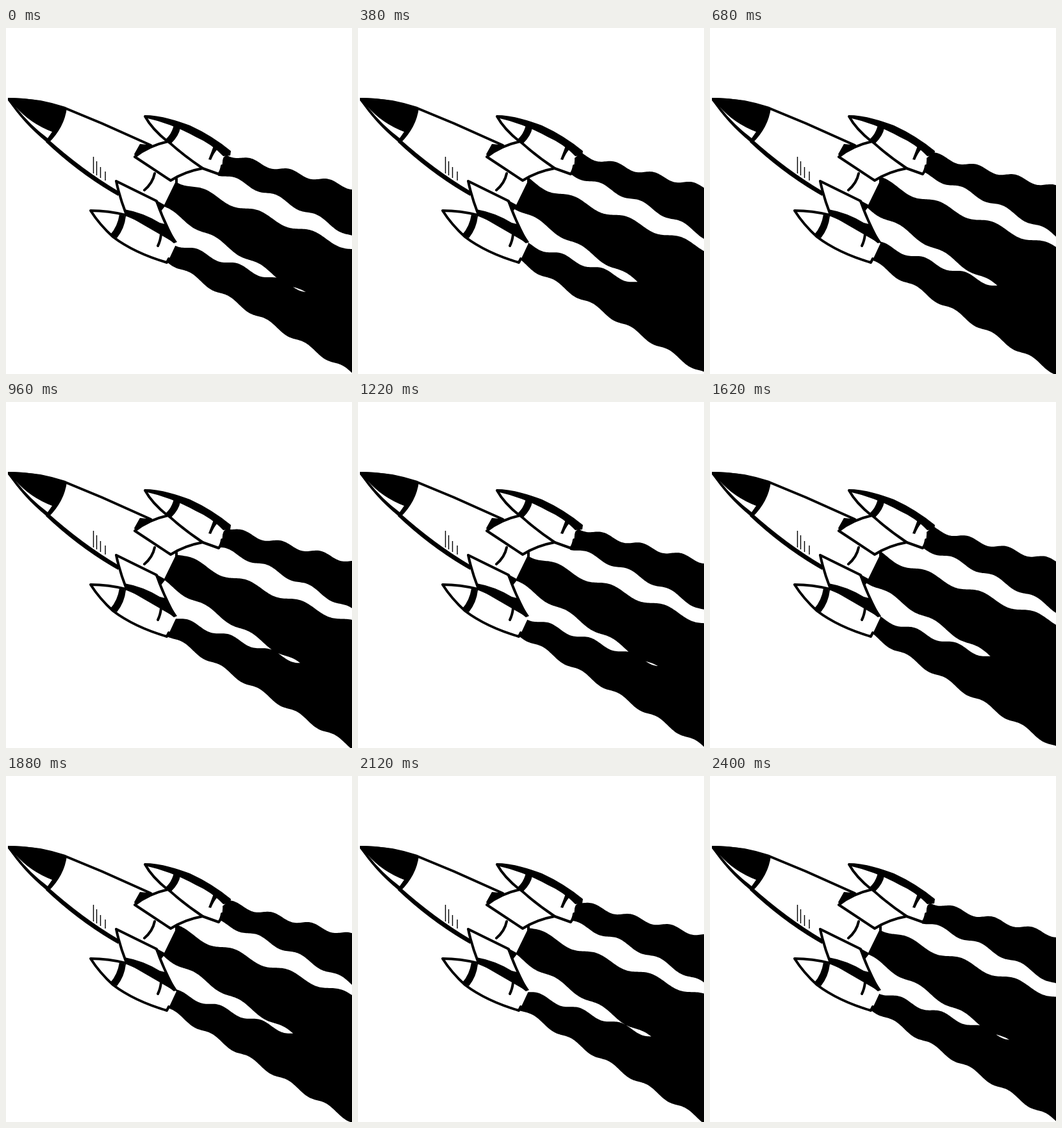
An HTML page for the animation above (2420 ms loop, 540 px wide and 540 px high).

```html
<!DOCTYPE html>
<html lang="en">
<head>
<meta charset="utf-8">
<title>Rocket</title>
<style>
  html, body { margin: 0; width: 100%; height: 100%; overflow: hidden; background: #fff; }
  svg { display: block; width: 100vw; height: 100vh; }
  .shell { fill: #fff; stroke: #000; stroke-width: 4; stroke-linejoin: round; }
  .line { fill: none; stroke: #000; stroke-width: 4; stroke-linecap: round; stroke-linejoin: round; }
  .hatch { fill: none; stroke: #000; stroke-width: 1.4; }
  .white { fill: #fff; }
</style>
</head>
<body>
<svg viewBox="0 0 540 540">
  <path id="smoke"/>

  <!-- body -->
  <path class="white" d="M4 111Q50 110 92 125L225 182L267 235L247 276L175 257Q120 226 65 176Q28 146 4 111Z"/>
  <path class="line" d="M226 183L150 149L92 125Q50 111 5 111Q28 147 65 177Q119 226 176 259"/>
  <path d="M64 172Q120 222 176 255L175 262Q115 228 62 178Z"/>
  <path d="M3 109Q50 109 95 125Q91 155 67 179L60 175Q28 147 3 113Z"/>
  <path class="white" d="M15 123Q38 149 72 162L65 172Q38 152 15 123Z"/>
  <path class="hatch" d="M136.500 201V227M141.500 208V230M147.500 217V234M155 224V238"/>
  <path class="line" d="M232 227Q229 242 216 253M266 235V243"/>

  <!-- upper booster -->
  <path class="white" d="M217 138Q240 138 285 154Q320 170 349 194L338 203Q339 217 331 229L305 218L252 177Z"/>
  <path class="line" d="M252 177Q228 158 217 138M304 218L332 228Q336 223 337 215"/>
  <path d="M216 136Q245 136 287 152Q322 168 351 192L350 199L339 200Q321 181 296 170Q258 149 217 140Z"/>
  <path d="M262 151L272 156Q270 168 258 180L249 174Q259 165 262 151Z"/>
  <path d="M324 184L331 188Q325 194 320 206L316 205Q320 195 324 184Z"/>
  <path class="shell" d="M201 201Q222 184 253 177Q277 199 307 219Q279 224 257 238Z"/>
  <path d="M200 197L209 181L231 183Q216 189 202 200Z"/>

  <!-- lower booster -->
  <path class="white" d="M132 285Q160 284 187 293L266 336L252 366Q188 346 165 324Z"/>
  <path class="line" d="M187 292Q160 285 132 285Q146 307 167 326Q200 351 251 366L254 360"/>
  <path d="M177 291L187 294Q185 313 173 328L163 322Q174 310 177 291Z"/>
  <path class="line" d="M242 322Q241 332 237 340"/>
  <path class="shell" d="M172 239L235 270Q246 302 263 333L187 289Q177 263 172 239Z"/>
  <path d="M185 283Q214 288 240 304L248 306L267 334L262 336Q230 310 186 293Z"/>
  <path d="M231 267L249 277L241 287Z"/>
</svg>
<script>
const LOOP = 2420, STEP = 20, PERIOD = LOOP / 2, END = 546;
const smoke = document.getElementById('smoke');

// An edge is a line through (x, y) carrying a wave that travels to the right.
// "bend" curves the line, "puff" lifts it near the nozzle.
const plumes = [
  { top:    { from: 341, x: 428, y: 220, slope: .258, wave: 61, amp: 3.7, puff: 3 },
    bottom: { from: 331, x: 407, y: 257.5, slope: .439, bend: .00054, wave: 64, amp: 3.7 } },
  { top:    { from: 262, x: 374, y: 282, slope: .375, wave: 84, amp: 4.7, puff: 6 },
    bottom: { from: 243, x: 380, y: 362, slope: .61, wave: 70, amp: 3.5 } },
  { top:    { from: 258, x: 347, y: 366, slope: .36, wave: 64, amp: 3.8 },
    bottom: { from: 250, x: 334, y: 413.5, slope: .61, wave: 59.5, amp: 3.4 } }
];

function edgePoints({ from, x: x0, y: y0, slope, bend = 0, wave, amp, puff = 0 }, phase) {
  const points = [];
  for (let x = from; x <= END; x += 2) {
    const dx = x - x0;
    const base = y0 + slope * dx + bend * dx * dx - puff * Math.exp((from - x) / 40);
    const y = base - amp * Math.sin(2 * Math.PI * (dx / wave - phase));
    points.push(x + ' ' + y.toFixed(2));
  }
  return points;
}

function draw(now) {
  const time = Math.floor(now % LOOP / STEP) * STEP;
  const phase = time / PERIOD;
  smoke.setAttribute('d', plumes.map(({ top, bottom }) =>
    'M' + [...edgePoints(top, phase), ...edgePoints(bottom, phase).reverse()].join('L') + 'Z'
  ).join(''));
  requestAnimationFrame(draw);
}
draw(performance.now());
</script>
</body>
</html>
```
